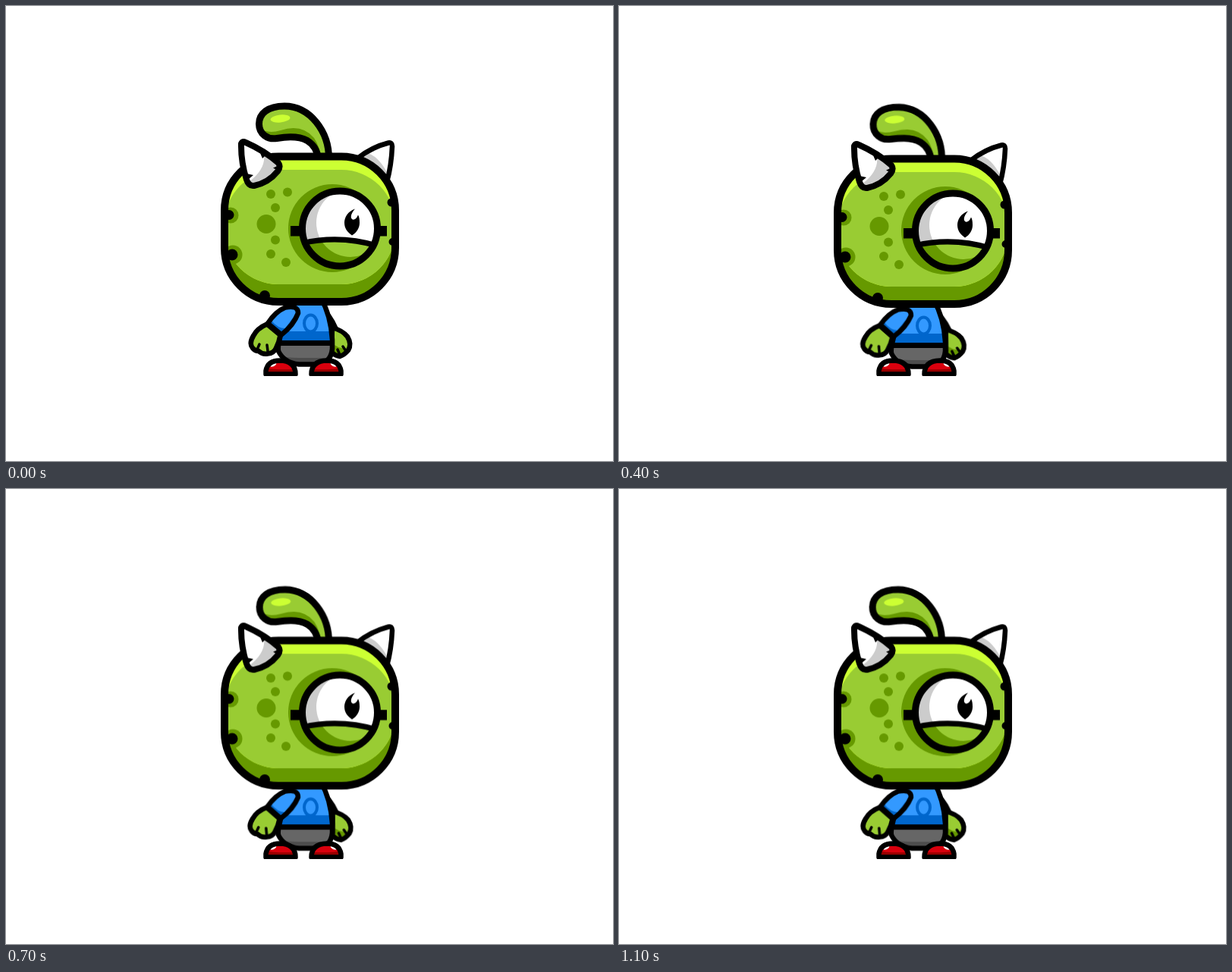
Recreate the animation shown at these times as an HTML page. Size 800 by 600 pixels, loop 1.2 s.

```html
<!DOCTYPE html>
<html lang="en">
<head>
<meta charset="utf-8">
<title>Idle monster</title>
<style>
  html, body { margin: 0; width: 100%; height: 100%; overflow: hidden; background: #fff; }
  svg { display: block; width: 800px; height: 600px; }

  .ink { stroke: #000; stroke-width: 9; stroke-linejoin: round; stroke-linecap: round; }
  .bold { stroke-width: 10; }
  .thin { stroke-width: 6.5; }
  .line { fill: none; stroke: #000; }
  .mid { fill: #9c3; }
  .dark { fill: #690; }
  .lime { fill: #cf3; }
  .blue { fill: #39f; }
  .navy { fill: #06c; }
  .none { fill: none; }

  .bob, .stalk, .armL, .armR { animation: bob 600ms step-end infinite; }
  .stalk { animation-name: lean; transform-origin: 415px 200px; }
  .armL { animation-name: swingL; transform-origin: 378px 402px; }
  .armR { animation-name: swingR; transform-origin: 418px 402px; }
  .open { animation: open 1200ms step-end infinite; }
  .shut { animation: shut 1200ms step-end infinite; }

  @keyframes bob {
    0% { transform: translateY(0); }
    16.66%, 83.33% { transform: translateY(1.3px); }
    33.33%, 66.66% { transform: translateY(3px); }
    50% { transform: translateY(4px); }
  }
  @keyframes lean {
    0% { transform: rotate(0deg); }
    16.66%, 83.33% { transform: rotate(.8deg); }
    33.33%, 66.66% { transform: rotate(1.9deg); }
    50% { transform: rotate(2.4deg); }
  }
  @keyframes swingL {
    0% { transform: rotate(0deg); }
    16.66%, 83.33% { transform: rotate(1.6deg); }
    33.33%, 66.66% { transform: rotate(2deg); }
    50% { transform: rotate(2.2deg); }
  }
  @keyframes swingR {
    0% { transform: rotate(0deg); }
    16.66%, 83.33% { transform: rotate(-1.6deg); }
    33.33%, 66.66% { transform: rotate(-2deg); }
    50% { transform: rotate(-2.2deg); }
  }
  @keyframes open {
    0%, 58.33% { visibility: visible; }
    50% { visibility: hidden; }
  }
  @keyframes shut {
    0%, 58.33% { visibility: hidden; }
    50% { visibility: visible; }
  }
</style>
</head>
<body>
<svg viewBox="0 0 800 600">
  <defs>
    <rect id="skull" x="288" y="198.500" width="225" height="191.500" rx="71"/>
    <path id="stalk" d="M425.500 202C426 166 401 132 367 132C345 132 333.500 142 333.500 155.500C333.500 169 345 176.500 357 174.500C372 172 386 171.500 397 177.500C406 183 410.500 191 411.500 202"/>
    <path id="hornL" d="M310 181.500Q312 178 316 180Q341 191 359 207Q362.500 212 358 218Q346 233 327 237Q320 238 317 229Q309.500 206 310 181.500Z"/>
    <path id="hornR" d="M463 201Q482 186 504 180.500Q509 179.500 509 185Q508 210 502 232L480 232Z"/>
    <path id="torso" d="M372 385L415 385Q428 408 430 440L430 452Q428 472.500 408 472.500L386 472.500Q366 470 359 455Q358 448 361 438Q368 410 372 385Z"/>
    <path id="sleeve" d="M368 397.500Q385 394 385 405Q379 421 363 433.500L345 418.500Q355 403 368 397.500Z"/>
    <path id="handL" d="M344 419.500Q331 425 326 435Q320 445 325 451Q328 455 333 455Q338 460 345 458.500Q353 458 356 451Q360 443 361.500 434Z"/>
    <path id="handR" d="M430 424Q444 428 450 436Q456 446 451 454Q446 460 440 462Q433 461 429 456Z"/>
    <path id="shoe" d="M342.500 485.500L342.500 481Q345 467.500 361 467.500Q381.500 468 381.500 485.500Z"/>
    <circle id="ball" cx="440" cy="293.500" r="49.500"/>
    <path id="lid" d="M385 314Q440 300 495 318L495 350L385 350Z"/>

    <clipPath id="stage"><rect x="282.500" y="127" width="236" height="361"/></clipPath>
    <clipPath id="inSkull"><use href="#skull"/></clipPath>
    <clipPath id="inRaised"><use href="#skull" transform="translate(0 -23)"/></clipPath>
    <clipPath id="inStalk"><use href="#stalk"/></clipPath>
    <clipPath id="inHornL"><use href="#hornL"/></clipPath>
    <clipPath id="inHornR"><use href="#hornR"/></clipPath>
    <clipPath id="inTorso"><use href="#torso"/></clipPath>
    <clipPath id="inSleeve"><use href="#sleeve"/></clipPath>
    <clipPath id="inHandR"><use href="#handR"/></clipPath>
    <clipPath id="inShoe"><use href="#shoe"/></clipPath>
    <clipPath id="inBall"><use href="#ball"/></clipPath>
    <clipPath id="inLid"><use href="#lid"/></clipPath>

    <g id="foot">
      <use href="#shoe" fill="#d9000d"/>
      <path fill="#900" clip-path="url(#inShoe)" d="M340 477Q350 480 384 479L384 488L340 488Z"/>
      <ellipse cx="352" cy="472.500" rx="4.500" ry="2.700" fill="#fff" transform="rotate(-25 352 472.500)"/>
      <use href="#shoe" class="ink thin none"/>
    </g>
  </defs>

  <g clip-path="url(#stage)">
    <g class="bob">
      <!-- far arm -->
      <g class="armR">
        <path class="ink thin navy" d="M414 396Q427 408 434 424L426 428Z"/>
        <use href="#handR" class="mid"/>
        <path class="dark" clip-path="url(#inHandR)" d="M426 440Q434 452 450 452L446 466L426 466Z"/>
        <use href="#handR" class="ink thin none"/>
        <path class="line" stroke-width="3.500" stroke-linecap="round" d="M437 453L440 460M444 449L448 455"/>
      </g>

      <!-- torso -->
      <use href="#torso" class="blue"/>
      <g clip-path="url(#inTorso)">
        <rect class="navy" x="350" y="429" width="90" height="16"/>
        <rect x="350" y="445" width="90" height="30" fill="#666"/>
        <path fill="#4d4d4d" d="M350 458Q365 464 385 464L440 464L440 480L350 480Z"/>
        <path class="line" stroke-width="7" d="M350 444.500L440 444.500"/>
      </g>
      <ellipse class="none" cx="401.500" cy="418.500" rx="8.500" ry="11" stroke="#06c" stroke-width="4"/>
      <use href="#torso" class="ink thin none"/>
    </g>

    <use href="#foot"/>
    <use href="#foot" transform="matrix(-1 0 0 1 784 0)"/>

    <g class="bob">
      <!-- near arm -->
      <g class="armL">
        <use href="#handL" class="ink thin mid"/>
        <path class="line" stroke-width="3.500" stroke-linecap="round" d="M334 446L331 453M344 447L345 455"/>
        <use href="#sleeve" class="blue"/>
        <path class="navy" clip-path="url(#inSleeve)" d="M344 414L350 415Q358 425 368 425L386 400L390 412L364 436L344 420Z"/>
        <use href="#sleeve" class="ink thin none"/>
      </g>

      <g class="stalk">
        <use href="#stalk" class="mid"/>
        <path class="dark" clip-path="url(#inStalk)" d="M330 157Q341 170 362 164Q390 155 406 174Q414 186 416 204L400 210L330 185Z"/>
        <ellipse class="lime" cx="361.500" cy="148.500" rx="13" ry="5" transform="rotate(-6 361.500 148.500)"/>
        <use href="#stalk" class="ink none"/>
      </g>

      <!-- far horn -->
      <use href="#hornR" fill="#fff"/>
      <path fill="#ccc" clip-path="url(#inHornR)" d="M460 205L474 193Q490 197 502 219L496 234Z"/>
      <use href="#hornR" class="ink thin none"/>
      <path d="M480 189L486 185L484 192Z"/>

      <!-- head -->
      <g clip-path="url(#inSkull)">
        <use href="#skull" class="dark"/>
        <g clip-path="url(#inRaised)">
          <use href="#skull" class="lime"/>
          <use href="#skull" class="mid" transform="translate(0 17.500)"/>
        </g>
        <g class="dark">
          <circle cx="296" cy="276" r="10.500"/>
          <circle cx="299" cy="328" r="12.500"/>
          <circle cx="349" cy="248" r="6"/>
          <circle cx="371" cy="245.500" r="6"/>
          <circle cx="355" cy="266" r="6"/>
          <circle cx="343" cy="287.500" r="12.500"/>
          <circle cx="355" cy="308.500" r="6"/>
          <circle cx="349" cy="327" r="6"/>
          <circle cx="369" cy="338" r="6"/>
        </g>
        <circle cx="294" cy="275.500" r="6.500"/>
        <circle cx="298" cy="328" r="7.500"/>
        <circle cx="341" cy="382" r="7"/>
        <circle cx="508" cy="259" r="5.500"/>
        <circle cx="509.500" cy="311" r="5"/>
      </g>
      <use href="#skull" class="ink bold none"/>

      <!-- eye -->
      <circle class="dark" cx="430" cy="293" r="58"/>
      <g class="open">
        <g clip-path="url(#inBall)">
          <use href="#ball" fill="#ccc"/>
          <circle cx="454" cy="286" r="45" fill="#fff"/>
          <path d="M460 267.500C450 271 446 279 446 286C446 294 451 299 456 302.500C462 299 466 293 466 286C466 281 465.500 278 464 275.500C462 281 458 283 456 281C453 278 456 272 460 267.500Z"/>
          <g clip-path="url(#inLid)">
            <use href="#ball" class="dark"/>
            <circle class="mid" cx="454" cy="286" r="45"/>
          </g>
          <path class="line" stroke-width="7" d="M385 314Q440 300 495 318"/>
        </g>
      </g>
      <g class="shut">
        <g clip-path="url(#inBall)">
          <use href="#ball" class="dark"/>
          <circle class="mid" cx="454" cy="286" r="45"/>
        </g>
        <path class="line" stroke-width="8.500" d="M386 298Q440 283 495 298"/>
      </g>
      <use href="#ball" class="ink none"/>
      <path d="M375 290h14v13.500h-14ZM491 290h11v13.500h-11Z"/>

      <!-- near horn -->
      <use href="#hornL" fill="#fff"/>
      <path fill="#ccc" clip-path="url(#inHornL)" d="M338 188Q347 212 320 232L326 242L368 222L360 200Z"/>
      <use href="#hornL" class="ink none" stroke-width="8" style="stroke-width: 8"/>
      <path d="M317 221L326 223L320 228ZM335 194L342 197L338 201ZM360 210L352 213.500L358 217Z"/>
    </g>
  </g>
</svg>
</body>
</html>
```
